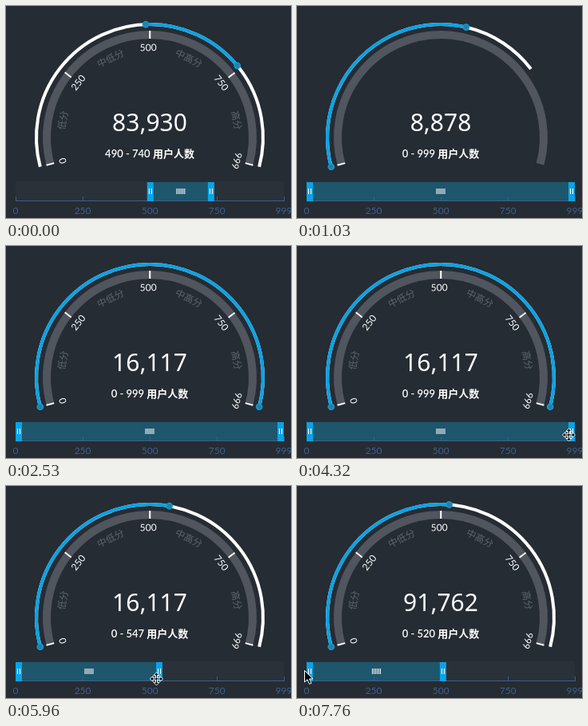
These frames come from a looping animation (357 by 266 pixels, 8 s). An HTML page:

```html
<!DOCTYPE html>
<html lang="zh">
<head>
<meta charset="utf-8">
<style>
html, body { margin: 0; width: 100%; height: 100%; overflow: hidden; background: #252c33; }
svg { display: block; width: 357px; height: 266px; }
text { text-anchor: middle; font: 12px Lato, "Noto Sans CJK SC", "Noto Sans CJK", sans-serif; fill: #fff; }
.band { fill: #5f656c; }
.axis { fill: #405f8c; }
#range { font-size: 13px; font-weight: 600; }
#count { font: 30px "Noto Sans", sans-serif; }
path { fill: none; }
</style>
</head>
<body>
<svg id="stage" viewBox="0 0 357 266"></svg>
<script>
const LOOP = 8000, LOAD = 450, MAX = 999;
const CX = 180, CY = 165, R = 142, RING = 129;
const stage = document.getElementById('stage');

function add(tag, attrs, parent = stage) {
  const el = document.createElementNS('http://www.w3.org/2000/svg', tag);
  set(el, attrs);
  return parent.appendChild(el);
}
function set(el, attrs) {
  for (const k in attrs) k === 'text' ? el.textContent = attrs[k] : el.setAttribute(k, attrs[k]);
}
const clamp = x => Math.max(0, Math.min(1, x));
const ease = x => x * x * (3 - 2 * x);
// Everything is already built before the reload at LOAD.
const ramp = (t, start, length) => t < LOAD ? 1 : clamp((t - start) / length);

// Interpolates keys of the form [time, value, value...].
function track(t, keys, curve = x => x) {
  const i = keys.findIndex(k => k[0] > t);
  if (i === 0) return keys[0].slice(1);
  if (i < 0) return keys[keys.length - 1].slice(1);
  const a = keys[i - 1], b = keys[i], p = curve((t - a[0]) / (b[0] - a[0]));
  return a.slice(1).map((v, n) => v + (b[n + 1] - v) * p);
}

const angle = v => -105 + 210 * v / MAX;
const barX = v => 12 + 336 * v / MAX;
function polar(deg, r) {
  const a = deg * Math.PI / 180;
  return [CX + r * Math.sin(a), CY - r * Math.cos(a)];
}
function arc(from, to, r) {
  if (to - from < 0.01) return '';
  const large = to - from > 180 ? 1 : 0;
  return `M${polar(from, r)}A${r} ${r} 0 ${large} 1 ${polar(to, r)}`;
}

// Gauge
const ring = add('path', { stroke: '#51555e', 'stroke-width': 10 });
const rim = add('path', { stroke: '#fff', 'stroke-width': 4 });
const fill = add('path', { stroke: '#0aa3e6', 'stroke-width': 4 });
const knobs = [0, 1].map(() =>
  add('circle', { r: 3.6, fill: '#2e7d9f', stroke: '#0c9bd8', 'stroke-width': 1.6 }));

const values = [0, 250, 500, 750, MAX];
const ticks = values.map(() => add('path', { stroke: '#fff', 'stroke-width': 2 }));
const labels = values.map((v, i) => ({
  el: add('text', { text: v, dy: '.36em', 'font-weight': 600 }),
  deg: angle(v) - (i === 2 ? 1 : 0), r: 113, start: 960 + i * 20, length: 700
}));
['低分', '中低分', '中高分', '高分'].forEach((s, i) => labels.push({
  el: add('text', { text: s, dy: '.38em', class: 'band' }),
  deg: -78.75 + i * 52.5, r: 111, start: 1400 + i * 150, length: 600
}));
const count = add('text', { id: 'count', x: CX, y: 157 });
const range = add('text', { id: 'range', x: CX, y: 190 });

// Slider
add('rect', { x: 12, y: 220, width: 336, height: 25, fill: '#2a3138' });
const span = add('rect', { y: 221, height: 24, fill: '#1e566c' });
add('path', { d: 'M12 244.5H348' + values.map(v => `M${Math.floor(barX(v)) + .5} 239V245`).join(''), stroke: '#3d5f8b' });
const axis = values.map(v => add('text', { text: v, class: 'axis', dy: '.36em' }));

function grip(parent, n, step, top, height) {
  for (let i = 0; i < n; i++)
    add('rect', { x: (i - (n - 1) / 2) * step - .5, y: top, width: 1, height, fill: '#fff' }, parent);
}
const middle = add('g', {});
grip(middle, 6, 2, 229, 7);
const grips = [0, 1].map(() => {
  const g = add('g', {});
  add('rect', { x: -4, y: 221, width: 8, height: 24, fill: '#0aa3e6' }, g);
  grip(g, 2, 3, 229, 7);
  return g;
});

// Pointers
const ink = { style: 'fill:#000', stroke: '#fff', 'stroke-width': 1 };
const arrow = add('path', { ...ink, d: 'M.5 .5V15L4 11.8L6.5 17.5L9 16.4L6.5 11H11Z' });
const arm = a => `<path transform="rotate(${a})" d="M-1 0V-4.5H-3.5L0 -8L3.5 -4.5H1V0" style="fill:#000" stroke="#fff"/>`;
const mover = add('g', {});
mover.innerHTML = [0, 90, 180, 270].map(arm).join('') + '<rect x="-1" y="-1" width="2" height="2"/>';

function drawGauge(t, lo, hi) {
  const sweep = (start, length) => 210 * ramp(t, start, length);
  const reach = sweep(385, 1150);
  const a = angle(lo), b = Math.min(angle(hi), -105 + reach);
  set(ring, { d: arc(-105, -105 + sweep(385, 500), RING) });
  set(rim, { d: arc(-105, -105 + sweep(376, 872), R) });
  set(fill, { d: arc(a, b, R) });
  [a, b].forEach((deg, i) => {
    const [cx, cy] = polar(deg, R);
    set(knobs[i], { cx, cy });
  });
  ticks.forEach((el, i) => {
    const p = ramp(t, 950 + i * 200, 80), deg = angle(values[i]);
    set(el, { d: p ? `M${polar(deg, 134)}L${polar(deg, 134 - 10 * p)}` : '' });
  });
  for (const { el, deg, r, start, length } of labels) {
    const s = ramp(t, start, length);
    set(el, { transform: `translate(${polar(deg, r)})rotate(${deg})scale(${s})`, opacity: s });
  }
}

function drawSlider(t, lo, hi) {
  const a = barX(lo), b = barX(hi);
  set(span, { x: a, width: b - a });
  set(middle, { transform: `translate(${(a + b) / 2})` });
  set(grips[0], { transform: `translate(${a + 4})` });
  set(grips[1], { transform: `translate(${b - 4})` });
  axis.forEach((el, i) => {
    const s = ramp(t, 375 + i * 75, 150);
    set(el, { transform: `translate(${barX(values[i])} ${257 + 14 * (1 - s)})scale(${s})`, opacity: s });
  });
}

function drawPointer(t, hi) {
  let x, y;
  if (t < 4320) [x, y] = track(t, [[3500, 325, 268], [4250, 341, 237]], ease);
  else if (t < 7250) {
    x = barX(hi) - 7.5;
    [y] = track(t, [[5000, 237], [5960, 242], [6260, 242], [6560, 240]]);
  } else [x, y] = track(t, [[7250, 179, 240], [7450, 110, 244], [7600, 45, 241], [7760, 9, 231]]);
  const moving = t < 7250 && y < 246;
  set(arrow, { transform: `translate(${x} ${y})`, visibility: t >= 3570 && !moving ? 'visible' : 'hidden' });
  set(mover, { transform: `translate(${x} ${y})`, visibility: t >= 3570 && moving ? 'visible' : 'hidden' });
}

function draw(t) {
  const lo = t < LOAD ? 490 : 0;
  const [hi] = t < LOAD ? [740] : track(t, [[5000, MAX], [5960, 547], [6180, 547], [6560, 520]], ease);
  const [n] = t < LOAD ? [83930] :
    track(t, [[392, 0], [1552, 16117], [7250, 16117], [7760, 91762]]);
  set(count, { text: Math.round(n).toLocaleString('en-US') });
  set(range, { text: `${lo} - ${Math.round(hi)} 用户人数` });
  drawGauge(t, lo, hi);
  drawSlider(t, lo, hi);
  drawPointer(t, hi);
}

const begin = performance.now();
function tick() {
  draw((performance.now() - begin) % LOOP);
  requestAnimationFrame(tick);
}
tick();
</script>
</body>
</html>
```
